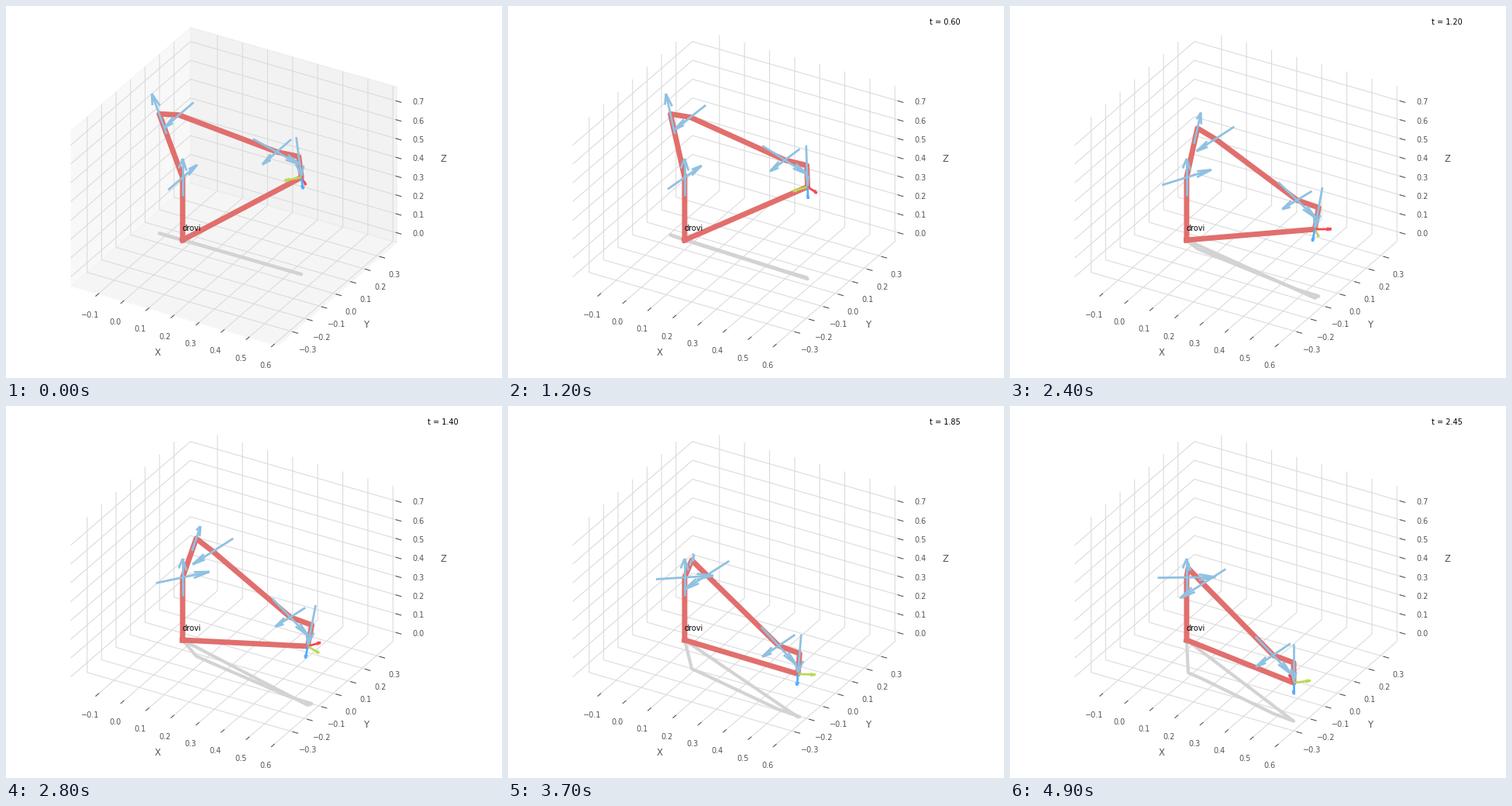
These frames come from a looping animation (640x480 px, 5 s). A matplotlib script:

```python
import numpy as np
import matplotlib.pyplot as plt
from matplotlib.animation import FuncAnimation

FRAMES, INTERVAL, DT = 50, 100, 0.05
GREY = "#555555"
JOINT_COLOR = "#8FC1E2"
EE_COLORS = ("#F84752", "#BADA55", "#54AEFF")

plt.rcParams.update({
    "font.family": "DejaVu Sans", "font.size": 7, "axes.labelsize": 8.4,
    "axes.labelcolor": GREY, "xtick.color": GREY, "ytick.color": GREY,
    "axes.edgecolor": "white", "axes.linewidth": 1, "lines.linewidth": 0.8,
    "grid.color": "#dbdbdb", "grid.linewidth": 0.8,
})

# Modified DH rows of the arm: a, d, alpha
LINKS = [
    (0, 0.333, 0), (0, 0, -np.pi / 2), (0, 0.316, np.pi / 2),
    (0.0825, 0, np.pi / 2), (-0.0825, 0.384, -np.pi / 2),
    (0, 0, np.pi / 2), (0.088, 0, np.pi / 2),
]
FLANGE = 0.107


def link_transform(a, d, alpha, theta):
    ca, sa, ct, st = np.cos(alpha), np.sin(alpha), np.cos(theta), np.sin(theta)
    return np.array([
        [ct, -st, 0, a],
        [st * ca, ct * ca, -sa, -d * sa],
        [st * sa, ct * sa, ca, d * ca],
        [0, 0, 0, 1],
    ])


def forward(q):
    """Poses of the seven joints followed by the flange."""
    pose, poses = np.eye(4), []
    for row, angle in zip(LINKS, q):
        pose = pose @ link_transform(*row, angle)
        poses.append(pose)
    poses.append(pose @ link_transform(0, FLANGE, 0, 0))
    return poses


def solve_pose(goal, q, steps=15, eps=1e-6):
    """Gauss-Newton inverse kinematics; the first joint stays fixed."""
    q = np.array(q, float)

    def error(angles):
        return (forward(angles)[-1] - goal)[:3].ravel()

    for _ in range(steps):
        base = error(q)
        jac = np.array([(error(q + eps * e) - base) / eps
                        for e in np.eye(7)[1:]]).T
        q[1:] -= np.linalg.lstsq(jac, base, rcond=None)[0]
    return q


h = np.sqrt(0.5)
GOAL = np.array([
    [-h, h, 0, 0.6],
    [h, h, 0, -0.3],
    [0, 0, -1, 0.2034],
    [0, 0, 0, 1],
])
Q_START = np.array([0, -0.3, 0, -2.2, 0, 2.0, np.pi / 4])
Q_END = solve_pose(GOAL, [-1.024, 0.79, 0.648, -1.692, -0.597, 2.275, -2.476])


def joint_angles(i):
    s = i / (FRAMES - 1)
    return Q_START + (Q_END - Q_START) * s**3 * (10 - 15 * s + 6 * s * s)


fig = plt.figure(figsize=(6.4, 4.8), dpi=100, facecolor="white")
fig.subplots_adjust(left=-0.09, right=0.99, bottom=0, top=1)
ax = fig.add_subplot(projection="3d", proj_type="ortho", computed_zorder=False)
ax.set_facecolor("white")
ax.set(xlabel="X", ylabel="Y", zlabel="Z")
ax.set_xticks(np.arange(-1, 7) / 10)
ax.set_yticks(np.arange(-3, 4) / 10)
ax.set_zticks(np.arange(0, 8) / 10)
HALF = 0.41335
ax.set_xlim(0.2057 - HALF, 0.2057 + HALF)
ax.set_ylim(-HALF, HALF)
ax.set_zlim(0.3614 - HALF, 0.3614 + HALF)

shadow, = ax.plot([], [], [], lw=3, color="lightgrey", zorder=2)
arm, = ax.plot([], [], [], lw=5, color="#E16F6D", zorder=3)
ax.text(0, 0, 0.05, "drovi", color="black", zorder=10)
timer = fig.text(0.85, 0.95, "", color="black")
arrows = []


def add_arrow(start, vec, color):
    arrows.append(ax.quiver(*start, *vec, color=color, linewidth=2, zorder=5))


def update(i):
    poses = forward(joint_angles(i))
    origin = np.zeros(3)
    path = np.array([origin, *(p[:3, 3] for p in poses), origin]).T
    arm.set_data_3d(*path)
    shadow.set_data_3d(path[0], path[1], np.zeros(path.shape[1]))

    while arrows:
        arrows.pop().remove()
    flange = poses[-1]
    for k, color in enumerate(EE_COLORS):
        add_arrow(flange[:3, 3], 0.06 * flange[:3, k], color)
    for pose in poses[:-1]:
        axis = 0.2 * pose[:3, 2]
        add_arrow(pose[:3, 3] - axis / 2, axis, JOINT_COLOR)

    # The tinted walls show only at the start of the loop.
    for axis, tone in ((ax.xaxis, 0.95), (ax.yaxis, 0.9), (ax.zaxis, 0.925)):
        axis.set_pane_color((tone,) * 3 + (0.5,) if i == 0 else (1, 1, 1, 0))
    timer.set_text(f"t = {i * DT:.2f}" if i else "")
    return [arm, shadow, timer, *arrows]


anim = FuncAnimation(fig, update, frames=FRAMES, interval=INTERVAL,
                     repeat=True, repeat_delay=0, blit=False)
plt.show()
```
